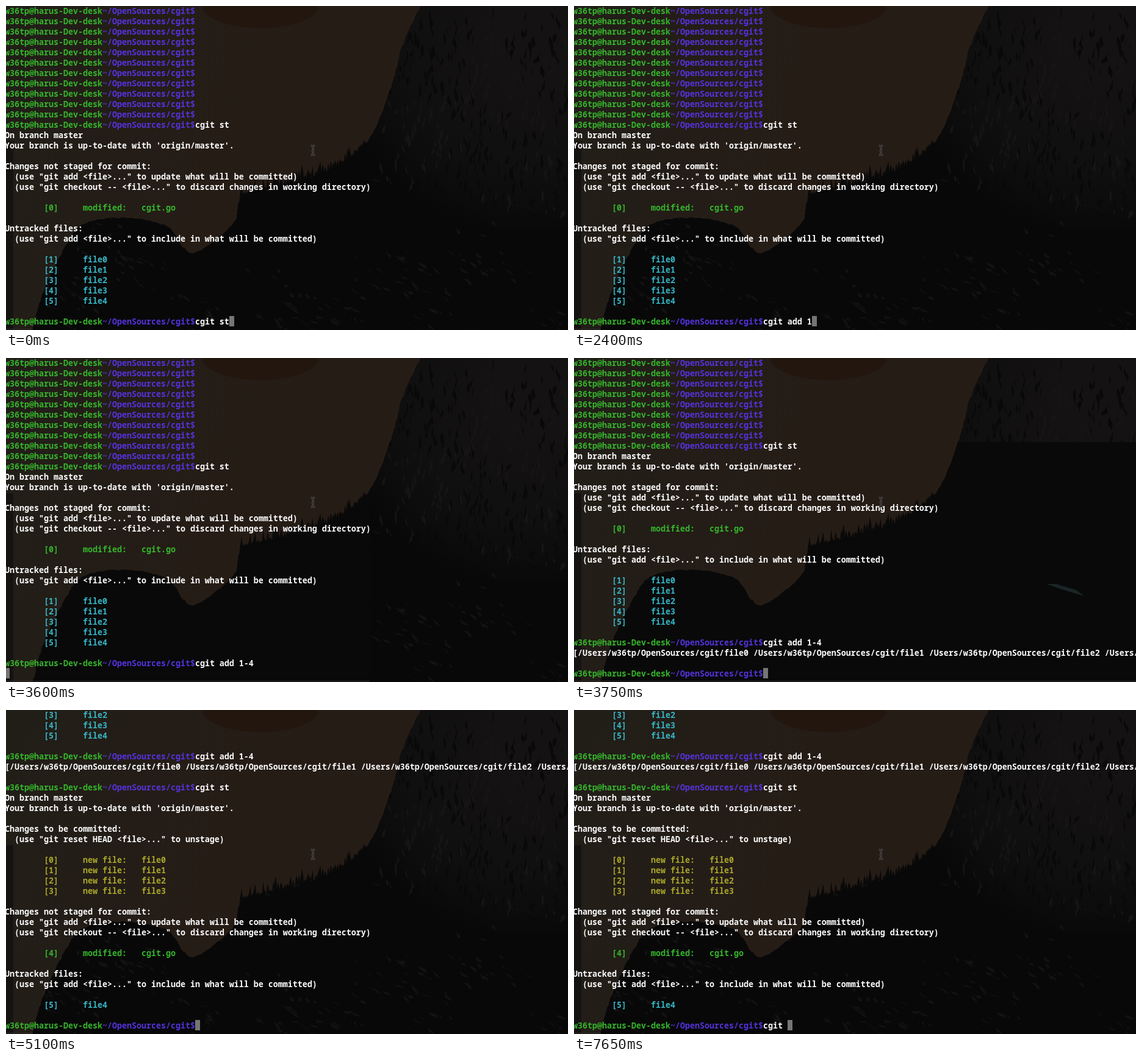
These frames come from a looping animation (921x532 px, 8 s). An HTML page with a canvas:

```html
<!DOCTYPE html>
<html lang="en">
<head>
<meta charset="utf-8">
<title>Terminal session</title>
<style>
  html, body { margin: 0; width: 921px; height: 532px; overflow: hidden; background: #090909; }
  canvas, svg { position: absolute; left: 0; top: 0; display: block; }
  text {
    font: 600 13.333px "Noto Sans Mono", "DejaVu Sans Mono", monospace;
    font-variant-ligatures: none;
    white-space: pre;
  }
</style>
</head>
<body>
<canvas id="base" width="921" height="532"></canvas>
<canvas id="rock" width="921" height="532"></canvas>
<svg width="921" height="532" viewBox="0 0 921 532">
  <defs>
    <path id="beam" d="M-3 -7.500Q0 -7.500 0 -5V5Q0 7.500 -3 7.500M3 -7.500Q0 -7.500 0 -5M0 5Q0 7.500 3 7.500M-2 1H2"/>
  </defs>
  <rect id="caret" width="8" height="17" fill="#757575"/>
  <g id="screen"></g>
  <g fill="none" transform="translate(503 237)">
    <use href="#beam" stroke="#757575" stroke-width="2.4"/>
    <use href="#beam" stroke="#17120f" stroke-width="1.1"/>
  </g>
</svg>
<script>
const W = 921, H = 532, COL = 8, ROW = 17, LEFT = -2, ROWS = 31, LOOP = 8000;
const WHITE = '#fbfbfb', GREEN = '#35b52b', BLUE = '#5433dc', CYAN = '#37b6c6', YELLOW = '#a9a62b';
const USER = 'w36tp', HOST = 'harus-Dev-desk';
const $ = id => document.getElementById(id);

// ---------- wallpaper ----------
function seeded(seed) {
  return () => {
    seed = (seed * 1664525 + 1013904223) >>> 0;
    return seed / 4294967296;
  };
}

// Catmull-Rom curve through the key points, roughened a little.
function roughCurve(keys, rnd, steps = 14) {
  const at = i => keys[Math.max(0, Math.min(keys.length - 1, i))];
  const out = [];
  for (let i = 0; i < keys.length - 1; i++) {
    for (let s = 0; s < steps; s++) {
      const t = s / steps;
      out.push([0, 1].map(k => {
        const [a, b, c, d] = [-1, 0, 1, 2].map(o => at(i + o)[k]);
        const v = 2 * b + (c - a) * t + (2 * a - 5 * b + 4 * c - d) * t ** 2 + (3 * b - a - 3 * c + d) * t ** 3;
        return v / 2 + (rnd() - .5) * 2;
      }));
    }
  }
  return [...out, at(keys.length)];
}

function shape(points) {
  const path = new Path2D();
  points.forEach(p => path.lineTo(...p));
  path.closePath();
  return path;
}

// From the cliff top, down the tree line, over the dome to the lower left.
const crest = roughCurve([
  [680, 0], [651, 62], [633, 128], [598, 214], [548, 261], [490, 283], [425, 301], [384, 319],
  [372, 357], [306, 406], [264, 362], [195, 348], [128, 358], [98, 394], [62, 468], [44, H]
], seeded(3));
const land = shape([...crest, [W, H], [W, 0]]);

function drawBase() {
  const c = $('base').getContext('2d');
  const sky = c.createLinearGradient(0, 0, 420, 120);
  sky.addColorStop(0, '#211e18');
  sky.addColorStop(1, '#261c16');
  c.fillStyle = sky;
  c.fillRect(0, 0, W, H);

  c.fillStyle = '#22160e';
  c.beginPath();
  c.ellipse(417, 0, 95, 36, 0, 0, Math.PI);
  c.fill();

  c.fillStyle = '#151312';
  c.fillRect(0, 222, 12, H);

  c.fillStyle = '#090909';
  c.fill(land);
  drawTrees(c);

  c.fillStyle = '#1b2427';
  c.fill(shape([[774, 371], [790, 371], [823, 381], [836, 391], [800, 380]]));
  c.fillStyle = '#2d2b29';
  c.fillRect(0, 530, W, 1);
}

function drawTrees(c) {
  const rnd = seeded(21);
  for (const [x, y] of crest.filter(([x]) => x > 384 && x < 590)) {
    const h = 4 + 20 * rnd() ** 1.5, w = 2 + rnd() * 2;
    c.fill(shape([[x - w, y + 6], [x - w * .6, y - h * .5], [x, y - h], [x + w * .6, y - h * .4], [x + w, y + 6]]));
  }
}

// Steep streaks on the cliff, short slanted ones on the slopes below.
function drawRock() {
  const c = $('rock').getContext('2d');
  const rnd = seeded(7);
  c.clip(land);
  c.fillStyle = '#080809';
  c.fillRect(0, 0, W, H);
  const face = c.createRadialGradient(860, 60, 60, 860, 60, 320);
  face.addColorStop(0, '#141212');
  face.addColorStop(.6, '#100f0f');
  face.addColorStop(1, '#10101000');
  c.fillStyle = face;
  c.fillRect(0, 0, W, H);

  for (let i = 0; i < 1700; i++) {
    const x = rnd() * W, y = rnd() * H;
    const cliff = x > 600 && y < 340 - (W - x) * .2;
    const meadow = !cliff && x > 340 && y < 400;
    if (meadow && rnd() < .8) continue;
    const lit = Math.sin(x / 31 + Math.sin(y / 47) * 2) + Math.cos(y / 38 + x / 90) + rnd() * 2 > 1.3;
    const angle = (cliff ? 1.5 : .5) + (rnd() - .5) * .7;
    const len = (cliff ? 12 : 6) + rnd() * 16, wide = 1 + rnd() * (cliff ? 4 : 3);
    const ux = Math.cos(angle), uy = Math.sin(angle);
    c.fillStyle = lit ? (cliff ? '#161414' : '#131211') : '#090909';
    c.fill(shape([0, 1, 2, 3, 4, 5].map(n => {
      const along = len * (1 - Math.abs(n - 3) / 3), off = (n < 3 ? -1 : 1) * wide * rnd();
      return [x + ux * along - uy * off, y + uy * along + ux * off];
    })));
  }
}

// ---------- terminal log ----------
const plain = s => [[s, WHITE]];
const prompt = (cmd = '') => [[`${USER}@${HOST}`, GREEN], ['~/OpenSources/cgit$', BLUE], [cmd, WHITE]];
const item = (n, label, color) => [[`        [${n}]     ${label}`, color]];
const files = (from, to, shift, label, color) =>
  Array.from({ length: to - from + 1 }, (_, i) => item(from + i + shift, `${label}file${from + i}`, color));

const status = (staged, modified, untracked) => [
  ...['On branch master', "Your branch is up-to-date with 'origin/master'.", ''].map(plain),
  ...(staged.length ? [
    ...['Changes to be committed:', '  (use "git reset HEAD <file>..." to unstage)', ''].map(plain),
    ...staged, plain('')
  ] : []),
  ...['Changes not staged for commit:',
    '  (use "git add <file>..." to update what will be committed)',
    '  (use "git checkout -- <file>..." to discard changes in working directory)', ''].map(plain),
  item(modified, 'modified:   cgit.go', GREEN),
  ...['', 'Untracked files:', '  (use "git add <file>..." to include in what will be committed)', ''].map(plain),
  ...untracked, plain('')
];

const paths = [0, 1, 2, 3].map(n => `/Users/${USER}/OpenSources/cgit/file${n}`).join(' ');
const first = [
  ...Array.from({ length: 11 }, () => prompt()),
  prompt('cgit st'),
  ...status([], 0, files(0, 4, 1, '', CYAN))
];
const entered = [...first, prompt('cgit add 1-4')];
const added = [...entered, plain(`[${paths}]`), plain('')];
const second = [
  ...added,
  prompt('cgit st'),
  ...status(files(0, 3, 0, 'new file:   ', YELLOW), 4, files(4, 4, 1, '', CYAN))
];

// Where the rock detail survives a redraw.
const FULL = 'none';
const CORNER = 'polygon(0 0, 100% 0, 100% 100%, 596px 100%, 596px 172px, 0 172px)';
const TOP = 'inset(0 0 394px 0)';

// Each screen: start, log, rock detail, then [time, command] as typed (null: no prompt yet).
const screens = [
  [first, FULL, {
    0: 'cgit st', 450: 'cgit ', 900: 'cgit a', 1200: 'cgit ad', 1350: 'cgit add',
    1800: 'cgit add ', 2400: 'cgit add 1', 2850: 'cgit add 1-', 3450: 'cgit add 1-4'
  }],
  [entered, CORNER, { 3600: null }],
  [added, TOP, { 3750: '', 4350: 'cgit add 1-4', 4500: 'cgit st' }],
  [second, FULL, { 5100: '', 6150: 'cgit st', 7650: 'cgit ' }]
];
const steps = screens.flatMap(([log, detail, typed]) =>
  Object.entries(typed).map(([at, cmd]) => ({ at: +at, log, detail, cmd })));

function svg(tag, attrs) {
  const el = document.createElementNS('http://www.w3.org/2000/svg', tag);
  for (const key in attrs) el.setAttribute(key, attrs[key]);
  return el;
}

function textRow(line, row) {
  const el = svg('text', { x: LEFT, y: row * ROW + 13 });
  for (const [str, fill] of line) {
    const span = svg('tspan', { fill });
    span.textContent = str;
    el.append(span);
  }
  return el;
}

function show({ log, detail, cmd }) {
  const last = cmd === null ? plain('') : prompt(cmd);
  const col = last.reduce((n, [str]) => n + str.length, 0);
  $('screen').replaceChildren(...[...log, last].slice(-ROWS).map(textRow));
  $('caret').setAttribute('x', LEFT + col * COL);
  $('caret').setAttribute('y', (ROWS - 1) * ROW - 1);
  $('rock').style.clipPath = detail;
}

let shown = null;
const start = performance.now();
function tick() {
  const t = (performance.now() - start) % LOOP;
  const step = steps.findLast(s => s.at <= t);
  if (step !== shown) show(shown = step);
  requestAnimationFrame(tick);
}

drawBase();
drawRock();
tick();
</script>
</body>
</html>
```
